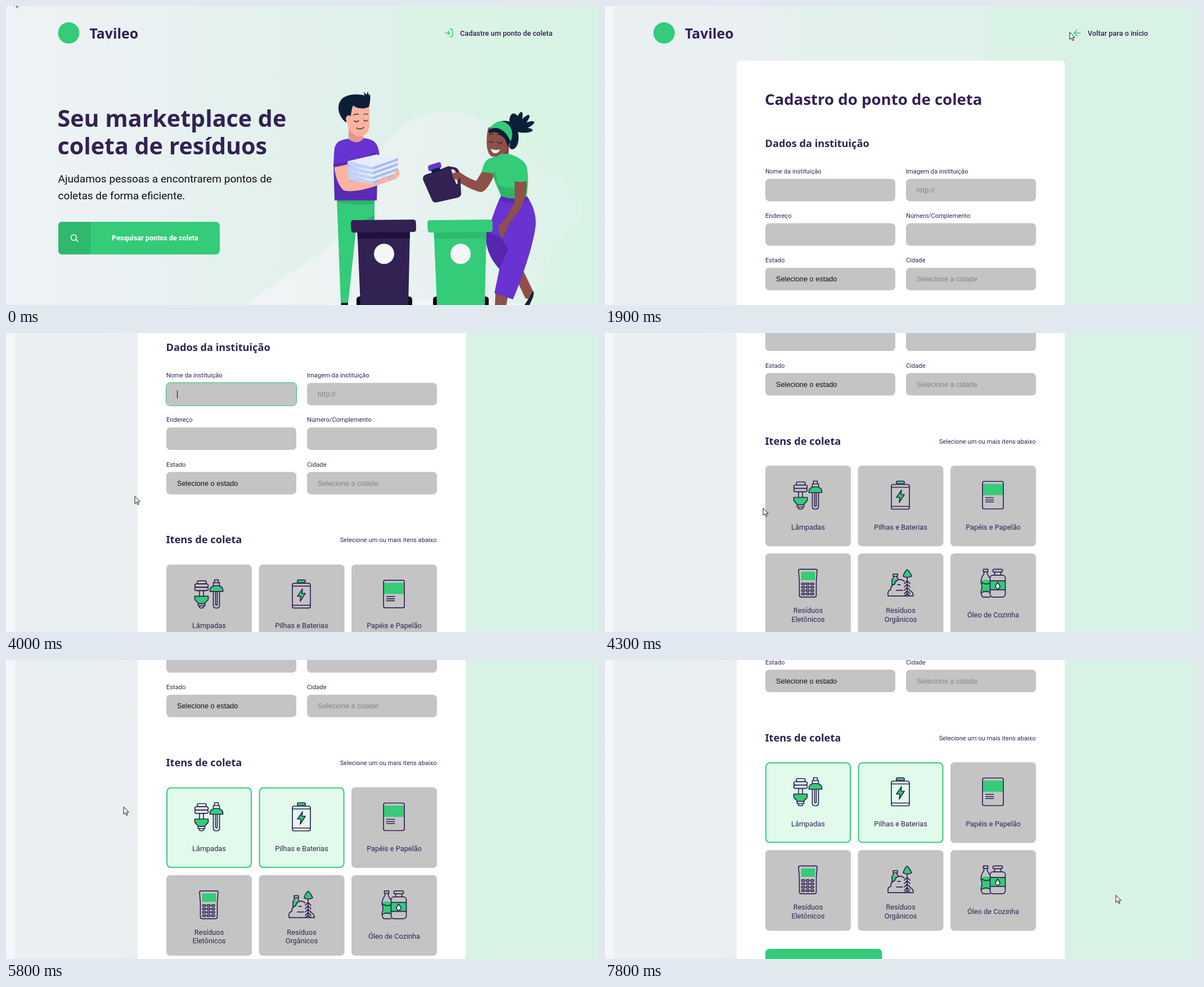
An HTML page that plays this animation: 1054 by 532 pixels, repeating every 8 s.

```html
<!DOCTYPE html>
<html lang="pt-BR">
<head>
<meta charset="utf-8">
<title>Pontos de coleta</title>
<style>
  html, body { margin: 0; width: 100%; height: 100%; overflow: hidden; }
  svg { display: block; width: 1054px; height: 532px; }
  text { font: 12.75px Roboto, sans-serif; fill: #322153; white-space: pre; }
  .head { font-family: "Noto Sans", sans-serif; font-weight: 700; }
  .form { font-family: "Liberation Sans", Arial, sans-serif; }
  .label { font-size: 11.16px; }
  .mid { text-anchor: middle; }
  .end { text-anchor: end; }
  .ico { fill: none; stroke: #322153; stroke-width: 1.7; stroke-linejoin: round; stroke-linecap: round; }
  .ico .g { fill: #34cb79; }
  .ico .b { fill: #34cb79; stroke: none; }
  .line { fill: none; stroke: #34cb79; stroke-width: 1.5; stroke-linecap: round; stroke-linejoin: round; }
  .face { fill: none; stroke: #0b1f38; stroke-width: 1.2; stroke-linecap: round; }
</style>
</head>
<body>
<svg id="stage" viewBox="0 0 1054 532" xmlns="http://www.w3.org/2000/svg"></svg>
<script>
const GREEN = '#34cb79', DARK = '#322153', GREY = '#c4c4c4', PURPLE = '#6833d0', NAVY = '#0b1f38';
const SKIN = '#feb39e', BROWN = '#8e5148';

const path = (d, fill, more = '') => `<path d="${d}" fill="${fill}" ${more}/>`;
const box = (x, y, w, h, r, fill, more = '') =>
  `<rect x="${x}" y="${y}" width="${w}" height="${h}" rx="${r}" fill="${fill}" ${more}/>`;
const frame = (x, y, w, h, r, cls = '') =>
  `<rect x="${x}" y="${y}" width="${w}" height="${h}" rx="${r}" class="${cls}"/>`;
const text = (s, x, y, cls = '', style = '') => `<text x="${x}" y="${y}" class="${cls}" style="${style}">${s}</text>`;
const size = n => `font-size:${n}px`;
const gradient = (id, stops) => `<linearGradient id="${id}">` +
  stops.map(([x, c]) => `<stop offset="${x / 1054}" stop-color="${c}"/>`).join('') + '</linearGradient>';

const brand = x => `<circle cx="${x + 19}" cy="48" r="19" fill="${GREEN}"/>` +
  text('Tavileo', x + 56, 57.5, 'head', size(24.8));

/* ---------- landing page ---------- */
function bin(x, main, shade) {
  return box(x + 10, 517, 12, 20, 5, '#0a0a14') + box(x + 97, 517, 12, 20, 5, '#0a0a14') +
    path(`M${x + 11.5} 402L${x + 105} 401L${x + 102} 532H${x + 17}Z`, main) +
    path(`M${x + 11.5} 402L${x + 105} 401L${x + 104.6} 413.5L${x + 12} 414Z`, shade) +
    path(`M${x + 5} 381L${x + 110} 380Q${x + 115.5} 380 ${x + 115.7} 385L${x + 116} 397Q${x + 116} 402 ${x + 111} 402` +
      `L${x + 5} 403Q${x + 0.5} 403 ${x + 0.5} 398L${x} 386Q${x} 381 ${x + 5} 381Z`, main) +
    `<circle cx="${x + 59}" cy="441" r="18" fill="#f4f6f8"/>`;
}

function man() {
  const sheets = [0, 1, 2, 3].map(i => {
    const y = 302 - i * 8.6, x = 610 - i;
    return path(`M${x} ${y}L652 ${y + 10}V${y + 15}L${x} ${y + 8}Q${x - 4} ${y + 4} ${x} ${y}Z`, '#c0d2fa') +
      path(`M652 ${y + 10}L697 ${y - 6}V${y - 1}L652 ${y + 15}Z`, '#aabdf0') +
      path(`M${x} ${y}L658 ${y - 12}L697 ${y - 6}L652 ${y + 10}Z`, '#e6edfd');
  }).join('');
  return path('M588 343H655V390H623L608 529H595Z', GREEN) +
    path('M589 345H655V352Q620 356 589 349Z', '#2db46b') +
    path('M634 382L655 371V382Z', '#2db46b') +
    path('M596 528H608V533H595Z', NAVY) +
    path('M608 236C594 239 584 240 583 262L582 285L584 346H659L660 312L664 268C662 245 657 238 636 235C628 243 617 243 608 236Z', PURPLE) +
    path('M584 296L606 285L612 310L659 300V346H584Z', '#5a2bb6') +
    path('M607 283L657 260L660 270L610 290Z', '#5527ad') +
    path('M609 203V236C617 245 629 244 635 236V226Z', '#e3988a') +
    path('M606 172V206C608 222 619 233 630 232C642 231 646 222 646 208V174Z', SKIN) +
    path('M591 184C590 172 596 163 606 160C615 156 628 157 637 159L636 153L641 158L643 152L645 159L647 157C648 166 647 174 645 179C638 184 624 183 617 177C614 183 614 191 612 198L604 207C597 201 592 193 591 184Z', NAVY) +
    `<ellipse cx="609" cy="201" rx="5" ry="6.5" fill="${SKIN}"/>` +
    '<path class="face" d="M619 204q4 4 8 0M636 203q4 4 7 0M618 194q4-3 9-1M636 193q4-2 7 0M623 217q7 4 13-1"/>' +
    path('M583 283C585 302 590 319 600 328C616 333 650 324 674 314L693 308L700 299L696 292L688 298L668 302C645 309 624 312 612 311L607 281Z', SKIN) +
    sheets +
    path('M664 312L671 303L678 305L674 313ZM686 303L697 291Q702 298 698 302L690 307Z', SKIN) +
    path('M582 280L607 277V282L583 287Z', '#5a2bb6');
}

function woman() {
  const bun = [[-8, 15, 9], [18, 17, 5], [42, 18, 5], [66, 18, 5], [90, 15, 4.5]].map(([a, len, w]) =>
    `<ellipse cx="0" cy="${-len}" rx="${w}" ry="${len}" fill="${NAVY}" transform="translate(906 221) rotate(${a})"/>`).join('');
  return path('M905 482L918 468L938 510L931 522L923 520Z', BROWN) +
    path('M937 507Q940 512 934 524L930 533H921L930 519Z', NAVY) +
    path('M870 511L892 517L889 533H869Z', BROWN) +
    path('M880 338H925C937 352 944 376 941 394C937 424 920 478 901 522L868 511L877 468C861 450 853 432 852 408C860 395 868 360 880 338Z', PURPLE) +
    path('M852 400L878 411L893 432L877 468C861 450 853 432 852 400Z', '#5527ad') +
    path('M877 345Q900 360 930 344L925 338H880Z', '#5a2bb6') +
    bun + path('M874 207C894 198 913 212 911 237C910 250 904 256 898 255L885 240Z', NAVY) +
    path('M879 248L894 246L893 268C888 278 879 276 876 268Z', '#7a423d') +
    path('M857 216C853 236 852 262 864 268C876 270 887 263 890 254C898 252 898 241 891 240L886 220Z', BROWN) +
    path('M857 224L862 214L885 219L895 243L892 251L887 237C880 237 866 231 857 224Z', NAVY) +
    path('M856 229C865 222 875 222 887 237V243L870 240L856 238Z', BROWN) +
    path('M860 219C866 206 879 202 889 208C901 216 902 230 897 241C893 233 888 223 878 219C872 216 866 217 860 219Z', GREEN) +
    '<path class="face" d="M859 241q4 4 7 0M873 242q5 4 9 0M859 229q3-3 7-1M873 229q5-2 8 2"/>' +
    path('M862 254Q870 258 878 255Q876 262 869 262Q863 261 862 254Z', '#fff') +
    path('M848 291L869 298C862 315 852 332 843 331C829 328 812 318 799 310L794 302L798 295L808 297C820 305 831 310 836 311Z', BROWN) +
    path('M758 296L786 285L798 287Q805 289 807 300L809 334Q809 339 803 341L767 349Q760 351 757 345L742 311Q739 303 746 300Z', DARK) +
    path('M791 291Q797 289 799 295L803 314Q803 318 800 316Z', '#e2f3ec') +
    path('M753 283L769 278Q772 277 773 281L774 287L752 294L750 288Q750 284 753 283Z', PURPLE) +
    path('M755 292L770 287L773 292L758 298Z', NAVY) +
    path('M793 298L803 295L809 300L805 309L795 308Z', BROWN) +
    path('M860 271C870 268 876 267 879 263H893C911 268 924 277 926 288C929 305 928 322 925 339Q902 346 880 338C876 326 866 312 866 298L846 295C847 285 852 273 860 271Z', GREEN) +
    path('M866 300L870 293L874 318Q898 329 926 319L925 339Q902 346 880 338Z', '#2db46b') +
    path('M904 312L925 311C926 330 922 348 913 362L895 386L884 411L880 413L876 400V391L889 377L904 350Z', BROWN) +
    path('M902 311Q915 315 926 311V304H902Z', GREEN);
}

function landing() {
  return box(0, 0, 1054, 532, 0, 'url(#bgHome)') +
    path('M430 532C478 482 545 462 585 413C634 350 655 222 742 194C800 176 852 198 890 235C930 274 1003 315 1025 352C1037 376 990 396 975 430C960 470 955 505 930 532Z', 'url(#blob)') +
    path('M560 532Q740 512 930 532Z', '#f2f5f6') +
    woman() + man() + bin(613, DARK, '#1f0f3f') + bin(749, GREEN, '#2fba6f') +
    brand(92.5) +
    '<path class="line" d="M789 41.3h3.2q1.3 0 1.3 1.4v10.6q0 1.4-1.3 1.4H789M785.5 44.6l3.3 3.4-3.3 3.4M788.8 48h-8.3"/>' +
    text('Cadastre um ponto de coleta', 807, 52.5, '', 'font-weight:500') +
    text('Seu marketplace de', 91.5, 214.5, 'head', size(41.2)) +
    text('coleta de resíduos', 91.5, 264, 'head', size(41.2)) +
    text('Ajudamos pessoas a encontrarem pontos de', 92.5, 313.5, '', size(19.1) + ';fill:#111') +
    text('coletas de forma eficiente.', 92.5, 344, '', size(19.1) + ';fill:#111') +
    box(93, 384, 287, 58, 7, GREEN) +
    path('M150 384V442H100Q93 442 93 435V391Q93 384 100 384Z', '#2fb86e') +
    '<g class="line" style="stroke:#fff"><circle cx="120.5" cy="412" r="5"/><path d="M124.3 415.8l3.4 3.4"/></g>' +
    text('Pesquisar pontos de coleta', 265, 417, 'mid', 'fill:#fff;font-weight:700;font-size:12.6px');
}

/* ---------- registration page ---------- */
const keys = [0, 1, 2, 3].map(r => [0, 1, 2].map(c => frame(c * 8 - 11, r * 6, 5.5, 3, 1)).join('')).join('');
const ribs = [0, 1, 2, 3].map(i => `M7 ${i * 6 + 1}L12 ${i * 6 - 4}L17 ${i * 6 + 1}`).join('');
const ICONS = {
  lamp: frame(-20.5, -23.5, 16, 5.5, 2.7) + frame(-25, -18, 24, 6, 3) + frame(-25, -12, 24, 6, 3) +
    '<path d="M-21-6H-5M-16.5-6V4M-9.5-6V4M-19 17H-7V21H-19ZM-17 21V22Q-17 25-13 25Q-9 25-9 22V21"/>' +
    '<path class="g" d="M-25 4H-1V9C-2 13-6 13-7 17H-19C-20 13-24 13-25 9Z"/>' +
    '<path d="M8-15V-20H10V-25H17V-20H19V-15M8-4V20Q8 25 13.5 25Q19 25 19 20V-4M12-4V19Q13.5 21 15 19V-4M10-20H17"/>' +
    '<path class="g" d="M2-4.5V-7C2-12 7-15 13.5-15S25-12 25-7V-4.5Z"/>',
  battery: '<path class="g" d="M-7-20V-23Q-7-25-5-25H5Q7-25 7-23V-20Z"/>' + frame(-16, -19, 32, 44, 3) +
    '<path d="M-16-14H16M-16 20H16"/><path class="g" d="M2-9L-7 4H-1L-2 13L7-1H1Z"/>',
  paper: frame(-18, -20, 36, 20, 0, 'b') + frame(-18.5, -24.5, 37, 49, 3) + '<path d="M-13 4.5H1M-13 8.5H1M-13 12H1"/>',
  phone: frame(-12, -20, 25, 15, 1, 'b') + keys +
    '<path d="M-14-24.5H14Q16.5-24.5 16.5-22L15-2V22Q15 25 12 25H-12Q-15 25-15 22V-2L-16.5-22Q-16.5-24.5-14-24.5Z"/>',
  organic: '<path class="b" d="M-15-5L-9-9L-5-3L-13 5L-15 4Z"/>' +
    '<path d="M-22 23V18Q-22 13-17 12Q-17 3-10 2Q-9-7 2-6L7-3M-22 23H4M4 13H-7M-5 3H0M-15 5V-4Q-15-8-12-9V-12M-6-12V-9L-3-6M-13-16H-5V-12H-13ZM17 14Q23 16 23 23H4"/>' +
    `<path d="M12-9V21${ribs}M12 19L7 23M12 19L17 23"/>` +
    '<path class="g" d="M5-12Q7-20 12-24Q17-20 20-12Q12-8 5-12Z"/>',
  oil: '<path class="b" d="M-20-4Q-13-8-5-4V17H-19Q-21 7-20-4ZM-5-4H22V12H-5Z"/>' +
    '<path d="M-17-24.5H-9V-20H-17ZM-16-20V-16Q-22-8-21 0Q-18 7-21 14Q-22 20-18 25H-5M-10-20V-16L-6-9M-20-1Q-12 4-5 0M-20 17Q-12 12-5 17"/>' +
    frame(0, -24.5, 17, 5, 2) + '<path d="M3-19.5V-14M14-19.5V-14M-5-4H22M-5 12H22"/>' + frame(-5, -14, 27, 39, 5) +
    '<path d="M8.5-1C11 3 12.5 4 12.5 6A4 4 0 0 1 4.5 6C4.5 4 6 3 8.5-1Z" style="fill:#e8f7ef"/>'
};
const ITEMS = [['lamp', 'Lâmpadas'], ['battery', 'Pilhas e Baterias'], ['paper', 'Papéis e Papelão'],
  ['phone', 'Resíduos', 'Eletônicos'], ['organic', 'Resíduos', 'Orgânicos'], ['oil', 'Óleo de Cozinha']];
const CARD = { w: 152, h: 143.5 };
const cardAt = i => [285 + (i % 3) * 164.5, 630.5 + Math.floor(i / 3) * 156.3];

function card([icon, ...lines], i) {
  const [x, y] = cardAt(i), cx = x + CARD.w / 2;
  return box(x, y, CARD.w, CARD.h, 7, GREY, `id="card${i}"`) +
    `<g class="ico" transform="translate(${cx - 0.5} ${y + 52.5})">${ICONS[icon]}</g>` +
    lines.map((s, n) => text(s, cx, y + 113.5 + (n - (lines.length - 1) / 2) * 15.5, 'mid')).join('');
}

const FIELDS = [['Nome da instituição', ''], ['Imagem da instituição', 'http://'], ['Endereço', ''],
  ['Número/Complemento', ''], ['Estado', 'Selecione o estado'], ['Cidade', 'Selecione a cidade']];
const fieldAt = i => [285 + (i % 2) * 250, 307.4 + Math.floor(i / 2) * 79.2];

function field([label, value], i) {
  const [x, y] = fieldAt(i);
  return text(label, x, y - 9.6, 'label') + box(x, y, 231, 40, 7, GREY) +
    text(value, x + 19, y + 24.6, 'form', `fill:${i === 4 ? '#111' : '#858585'}`);
}

function register() {
  return box(0, 0, 1054, 532, 0, 'url(#bgForm)') + '<g id="scroll">' + brand(86) +
    '<path class="line" d="M845 48h-11.5M839 42.5l-5.5 5.5 5.5 5.5"/>' +
    text('Voltar para o início', 858, 52.5, '', 'font-weight:500') +
    box(234, 97.3, 583, 1000, 7, '#fff') +
    text('Cadastro do ponto de coleta', 284, 175.5, 'head', size(27.6)) +
    text('Dados da instituição', 284.5, 250.5, 'head', size(18.2)) +
    FIELDS.map(field).join('') +
    `<g id="focus"><rect x="284.5" y="307" width="232" height="41" rx="7" fill="none" stroke="${GREEN}" stroke-width="1.2"/>` +
    '<path d="M304.5 321V335" stroke="#000"/></g>' +
    text('Itens de coleta', 284.5, 593, 'head', size(18.3)) +
    text('Selecione um ou mais itens abaixo', 765.5, 591, 'label end') +
    ITEMS.map(card).join('') +
    box(285, 962.5, 207.5, 44.5, 7, GREEN) +
    text('Cadastrar ponto de coleta', 388.7, 989, 'form mid', 'fill:#fff;font-weight:700') + '</g>';
}

const POINTERS =
  '<path id="arrow" d="M0 .5V13.5L3 10.7L5.2 15.5L7.2 14.6L5.1 10H9.3Z" fill="#fff" stroke="#111"/>' +
  '<path id="hand" d="M-1.5 9V1.5Q0-.5 1.5 1.5V6Q3 5 4 6.5Q5.5 5.5 6.5 7Q8.5 6.5 8.5 9V12L7 16.5H0L-4.5 10.5Q-4.5 8-1.5 10ZM1.5 6V9M4 6.5V9M6.5 7V9.5" fill="#fff" stroke="#111"/>' +
  '<path id="beam" d="M-3-7.5H-1L0-7L1-7.5H3M0-7V7M-3 7.5H-1L0 7L1 7.5H3" fill="none" stroke="#333"/>';

document.getElementById('stage').innerHTML = '<defs>' +
  gradient('bgHome', [[0, '#f1f4f6'], [14, '#eef2f4'], [320, '#e8f1f1'], [360, '#e5f1ee'], [670, '#e0f1eb'], [700, '#daf3e6'], [1054, '#d8f3e4']]) +
  gradient('bgForm', [[0, '#f6f7f9'], [16, '#f4f5f8'], [17, '#ebeff2'], [300, '#e9eff1'], [352, '#e2f1ec'], [672, '#e1f1eb'], [692, '#d8f3e5'], [1054, '#d8f3e5']]) +
  '<linearGradient id="blob"><stop offset="0" stop-color="#f1f4f6"/><stop offset=".5" stop-color="#e8f2f0"/><stop offset=".75" stop-color="#e3f2ed"/><stop offset="1" stop-color="#dcf3e8"/></linearGradient></defs>' +
  `<g id="home">${landing()}</g><g id="form">${register()}</g><g id="pointer">${POINTERS}</g>`;

/* ---------- motion ---------- */
const POINTER = [[0, 14, -13], [300, 420, 517], [600, 957, 330], [900, 702, 71], [1000, 708, 70], [1700, 826, 46],
  [2100, 826, 46], [2300, 861, 80], [2700, 322, 361], [3000, 395, 339], [3200, 395, 339], [3600, 212, 283],
  [3900, 212, 283], [4300, 281, 311], [4700, 322, 328], [4800, 325, 328], [4900, 335, 330], [5200, 500, 318],
  [5400, 500, 318], [5800, 209, 261], [5900, 209, 261], [6400, 316, 360], [6900, 330, 372], [7800, 908, 418]];
const SCROLL = [[3600, 0], [3700, 60], [3800, 160], [3900, 160], [4300, 394.5], [4700, 399], [5400, 399],
  [5800, 404], [5900, 404], [6400, 509.5], [7000, 509.5], [7800, 448.5]];

function sample(track, t) {
  const n = track.findIndex(k => k[0] > t);
  if (n === 0) return track[0].slice(1);
  if (n < 0) return track[track.length - 1].slice(1);
  const a = track[n - 1], b = track[n], u = (t - a[0]) / (b[0] - a[0]);
  return a.slice(1).map((v, i) => v + (b[i + 1] - v) * u);
}

const el = id => document.getElementById(id);
const show = (id, on) => { el(id).style.display = on ? '' : 'none'; };
const inside = (x, y, [left, top], w, h) => x >= left && x <= left + w && y >= top && y <= top + h;

function pointerKind(t, x, y, s) {
  if (t < 1900) return inside(x, y, [778, 38], 193, 20) || inside(x, y, [93, 384], 287, 58) ? 'hand' : 'arrow';
  const py = y + s;
  if (ITEMS.some((_, i) => inside(x, py, cardAt(i), CARD.w, CARD.h))) return 'hand';
  if (FIELDS.some((_, i) => i < 4 && inside(x, py, fieldAt(i), 231, 40))) return 'beam';
  return 'arrow';
}

function select(i, on) {
  const c = el('card' + i), [x, y] = cardAt(i), d = on ? 1 : 0;
  const set = { x: x + d, y: y + d, width: CARD.w - 2 * d, height: CARD.h - 2 * d,
    fill: on ? '#e1faec' : GREY, stroke: on ? GREEN : 'none', 'stroke-width': 2 };
  for (const k in set) c.setAttribute(k, set[k]);
}

function draw(ms) {
  const t = Math.floor((ms % 8000) / 100) * 100;
  const [x, y] = sample(POINTER, t), [s] = sample(SCROLL, t);
  const kind = pointerKind(t, x, y, s);
  show('home', t < 1900);
  show('form', t >= 1900);
  show('focus', t >= 3300 && t < 4900);
  el('scroll').setAttribute('transform', `translate(0 ${-s})`);
  select(0, t >= 4900);
  select(1, t >= 5200);
  el('pointer').setAttribute('transform', `translate(${Math.round(x)} ${Math.round(y)})`);
  for (const k of ['arrow', 'hand', 'beam']) show(k, k === kind);
  show('pointer', t < 3100 || t >= 3300);
}

const start = performance.now();
function tick() {
  draw(performance.now() - start);
  requestAnimationFrame(tick);
}
draw(0);
requestAnimationFrame(tick);
</script>
</body>
</html>
```
